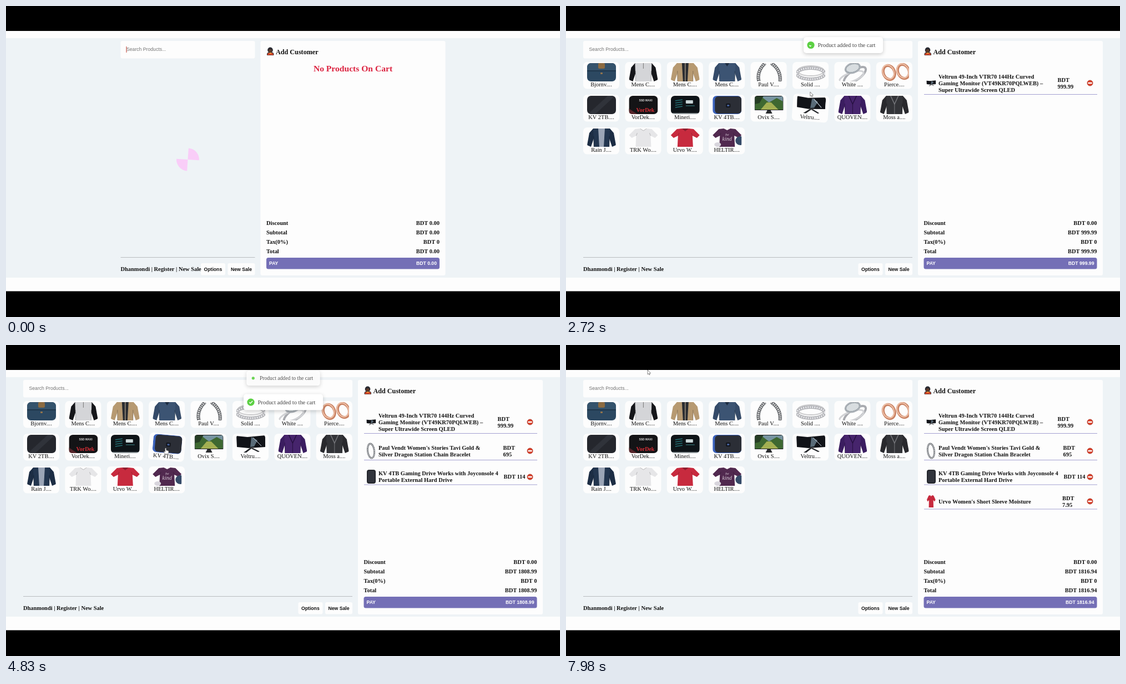
An HTML page with a canvas for the animation above (8 s loop, 998 px wide and 561 px high).

```html
<!DOCTYPE html>
<html lang="en">
<head>
<meta charset="utf-8">
<title>Point of sale</title>
<style>
html, body { margin: 0; width: 100%; height: 100%; overflow: hidden; background: #000 }
canvas { display: block }
</style>
</head>
<body>
<canvas id="stage" width="998" height="561"></canvas>
<script>
const c = document.getElementById('stage').getContext('2d');
const SERIF = '"Liberation Serif", serif', SANS = '"Liberation Sans", sans-serif';
const BODY = '10.4px ' + SERIF, BOLD = 'bold ' + BODY, BUTTON = 'bold 8.67px ' + SANS;
const LOOP = 8000, LOADED = 630, TOAST_LIFE = 2000;

const names = ['Bjornv', 'Mens C', 'Mens C', 'Mens C', 'Paul V', 'Solid ', 'White ', 'Pierce',
  'KV 2TB', 'VorDek', 'Mineri', 'KV 4TB', 'Ovix S', 'Veltru', 'QUOVEN', 'Moss a',
  'Rain J', 'TRK Wo', 'Urvo W', 'HELTIR'];

// Cart lines: time added, price, text lines, first baseline, middle, rule, price x
const cart = [
  { at: 2350, price: 999.99, y: 130.5, mid: 139, rule: 159.5, px: 885.5, wrap: true, thumb: 'screen',
    lines: ['Veltrun 49-Inch VTR70 144Hz Curved', 'Gaming Monitor (VT49KR70PQLWEB) –', 'Super Ultrawide Screen QLED'] },
  { at: 3650, price: 695, y: 188.5, mid: 191, rule: 207.5, px: 895.5, wrap: true, thumb: 'bracelet',
    lines: ["Paul Vendt Women's Stories Tavi Gold &", 'Silver Dragon Station Chain Bracelet'] },
  { at: 4680, price: 114, y: 234.5, mid: 238, rule: 252, px: 896.5, wrap: false, thumb: 'drive',
    lines: ['KV 4TB Gaming Drive Works with Joyconsole 4', 'Portable External Hard Drive'] },
  { at: 5600, price: 7.95, y: 285.5, mid: 282, rule: 296, px: 894, wrap: true, thumb: 'tee',
    lines: ["Urvo Women's Short Sleeve Moisture"] }
];

// Pointer path: time, x, y
const path = [[1380, 560, 50], [1480, 470, 98], [1580, 446, 125], [1690, 444, 211], [1750, 443, 209],
  [1950, 445, 193], [2350, 443, 186], [2650, 441, 162], [2720, 440, 155], [3000, 400, 142],
  [3300, 368, 135], [3650, 355, 138], [4200, 346, 141], [4400, 312, 165], [4680, 290, 182],
  [5000, 285, 190], [5200, 250, 215], [5300, 232, 232], [5580, 225, 237], [6150, 208, 240],
  [6330, 181, 240], [6500, 120, 225], [6590, 95, 172], [6620, 100, 162], [6900, 101, 154],
  [7500, 135, 97], [7980, 147, 45], [8000, 147, 45]];

const clamp = p => Math.max(0, Math.min(1, p));
const easeOut = p => 1 - (1 - clamp(p)) ** 3;

function text(s, x, y, font = BOLD, color = '#111', align = 'left') {
  c.font = font; c.fillStyle = color; c.textAlign = align;
  c.fillText(s, x, y);
}
function box(x, y, w, h, r, color) {
  c.fillStyle = color;
  c.beginPath(); c.roundRect(x, y, w, h, r); c.fill();
}
function poly(points, fill, stroke, width = 1) {
  c.beginPath();
  for (let i = 0; i < points.length; i += 2) c.lineTo(points[i], points[i + 1]);
  if (fill) { c.fillStyle = fill; c.fill(); }
  if (stroke) { c.strokeStyle = stroke; c.lineWidth = width; c.stroke(); }
}
function oval(x, y, rx, ry, tilt, fill, stroke, width = 1, dash = []) {
  c.beginPath(); c.ellipse(x, y, rx, ry, tilt, 0, 7);
  if (fill) { c.fillStyle = fill; c.fill(); }
  if (stroke) {
    c.strokeStyle = stroke; c.lineWidth = width;
    c.setLineDash(dash); c.stroke(); c.setLineDash([]);
  }
}
function at(x, y, draw, sx = 1, sy = sx) {
  c.save(); c.translate(x, y); c.scale(sx, sy); draw(); c.restore();
}

// Product pictures live in a 52 x 33 box
function jacket(body, sleeve = body, inner) {
  poly([11, 0, 4, 8, 0, 30, 7, 33, 14, 12, 38, 12, 45, 33, 52, 30, 48, 8, 41, 0], sleeve);
  poly([11, 0, 41, 0, 40, 33, 12, 33], body);
  if (inner) poly([20, 0, 32, 0, 30, 33, 22, 33], inner);
  poly([12, 33, 12, 14], null, '#0004');
  poly([40, 33, 40, 14], null, '#0004');
}
function tee(color) {
  poly([11, 1, 20, 0, 26, 3, 32, 0, 41, 1, 52, 12, 47, 17, 39, 13, 40, 33,
    12, 33, 13, 13, 5, 17, 0, 12], color);
  poly([13, 13, 15, 8], null, '#0003');
  poly([39, 13, 37, 8], null, '#0003');
}
function slab(color) { box(0, 0, 52, 33, 7, color); }
function lapels(color) {
  poly([19, 0, 26, 15, 33, 0], null, color, 1.5);
  poly([26, 15, 26, 33], null, color);
}
function screen() {
  poly([0, 2, 20, 4, 52, 1, 52, 22, 22, 24, 1, 22], '#111318');
  poly([27, 4, 38, 10, 32, 21, 25, 22], '#596b78');
  poly([30, 5, 45, 20], null, '#c8d4df', 1);
  poly([24, 24, 13, 32, 18, 32, 27, 25, 39, 31, 42, 30, 30, 24], '#25272b');
}
const pictures = [
  () => {
    slab('#2c4861');
    box(0, 0, 52, 13, [7, 7, 0, 0], '#35536c');
    box(20, 0, 12, 10, 2, '#8c6b42');
    poly([0, 14, 52, 14], null, '#1b3044', 1.5);
    box(24, 17, 4, 3, 1, '#93744d');
  },
  () => { jacket('#d4d5d8', '#15161a'); poly([26, 0, 26, 10], null, '#777'); },
  () => { jacket('#b79a72', '#b79a72', '#292b30'); poly([26, 0, 26, 33], null, '#857b6d', 2); },
  () => { jacket('#3c5473', '#354b69'); poly([22, 0, 26, 6, 30, 0], '#1c2b40'); },
  () => {
    for (const [color, width, dash] of [['#55585c', 6, []], ['#d8d8d8', 4, [2, 1.5]]]) {
      c.strokeStyle = color; c.lineWidth = width; c.setLineDash(dash);
      c.beginPath();
      c.moveTo(19, 0); c.quadraticCurveTo(3, 16, 8, 33);
      c.moveTo(30, 0); c.quadraticCurveTo(48, 12, 46, 33);
      c.stroke();
    }
    c.setLineDash([]);
  },
  () => {
    oval(26, 14, 24, 9, 0, null, '#c9c9cb', 2);
    oval(26, 19, 25, 10, 0, null, '#b3b4b8', 6);
    oval(26, 19, 25, 10, 0, null, '#ededf0', 3, [2, 2]);
  },
  () => {
    oval(30, 22, 23, 9, -.6, null, '#a9abb0', 4);
    oval(24, 25, 23, 8, -.35, null, '#d2d3d6', 3);
    oval(26, 9, 15, 10, -.3, '#aab0b6');
    oval(26, 9, 12, 7, -.3, '#d8dde0', '#75808a', 1, [1.5, 1.5]);
  },
  () => {
    for (const [x, y] of [[16, 17], [42, 15]]) {
      oval(x, y, 10, 13, -.4, null, '#c98263', 5);
      oval(x - 1, y - 1, 10, 13, -.4, null, '#efc2aa', 2);
    }
  },
  () => { slab('#25272d'); poly([8, 33, 44, 0], null, '#30333a', 9); },
  () => {
    slab('#141416');
    text('SSD MAXI', 18, 10, 'bold 5px ' + SANS, '#ddd');
    poly([0, 23, 15, 33, 0, 33], '#55252a');
    text('VorDek', 13, 29, 'bold 10px ' + SERIF, '#d72d35');
  },
  () => {
    slab('#0e1418');
    for (let i = 0; i < 4; i++) poly([8, 9 + i * 4, 21, 7 + i * 4], null, '#246f73', 1.3);
    box(27, 8, 13, 6, 1, '#c9d6d8');
    poly([27, 18, 43, 18], null, '#3c8a8c', 1);
    poly([2, 32, 50, 32], null, '#b9c2c4', 1.5);
  },
  () => { slab('#3b63bd'); box(4, 1, 48, 31, 6, '#2b2e36'); box(24, 14, 8, 7, 1, '#11141b'); box(26, 16, 4, 3, 0, '#45609a'); },
  () => {
    box(0, 0, 52, 26, 1, '#15181a');
    box(1, 1, 50, 24, 0, '#7794a0');
    poly([1, 8, 14, 3, 26, 12, 40, 4, 51, 10, 51, 25, 1, 25], '#3e6831');
    poly([22, 12, 30, 12, 43, 25, 11, 25], '#a3af52');
    poly([1, 1, 16, 1, 9, 13, 1, 15], '#263d24');
    poly([23, 26, 29, 26, 32, 32, 20, 32], '#292b2e');
  },
  screen,
  () => { jacket('#46246c', '#3b1d60'); lapels('#261040'); },
  () => { jacket('#333438', '#29292d'); lapels('#75767b'); },
  () => { jacket('#23364f', '#1c2d44', '#9ba5b6'); },
  () => { tee('#e6e6e8'); poly([20, 0, 26, 4, 32, 0], null, '#bbb'); },
  () => { tee('#c72a3e'); poly([20, 0, 26, 5, 32, 0], '#8d1e2f'); },
  () => {
    tee('#51294f');
    oval(50, 22, 9, 8, 0, '#354a68');
    oval(9, 29, 6, 4, 0, '#d8d5dc');
    text('be', 26, 13, 'italic 7px ' + SERIF, '#d7cbd7', 'center');
    text('kind', 26, 22, 'italic 10px ' + SERIF, '#d7cbd7', 'center');
  }
];
const thumbs = {
  screen: () => at(649.5, 134, screen, .32),
  bracelet: () => {
    oval(657.5, 191, 6, 13, -.12, null, '#777a7e', 3);
    oval(657.5, 191, 6, 13, -.12, null, '#c9cbce', 1.4, [2, 1]);
  },
  drive: () => { box(650, 225, 16, 25, 4, '#24262c'); box(652, 227, 12, 21, 3, '#31343c'); },
  tee: () => at(650, 271, () => tee('#c72a3e'), .3, .67)
};

const cardX = i => 31 + i % 8 * 75.4;
const cardY = i => 101 + Math.floor(i / 8) * 59;

function pointer(t) {
  const i = path.findIndex(p => p[0] > t);
  if (i < 1) return [-99, -99];
  const [t0, x0, y0] = path[i - 1], [t1, x1, y1] = path[i], p = (t - t0) / (t1 - t0);
  return [x0 + (x1 - x0) * p, y0 + (y1 - y0) * p];
}
function hovered(t) {
  const [x, y] = pointer(t);
  return names.findIndex((n, i) => x >= cardX(i) && x <= cardX(i) + 65 && y >= cardY(i) && y <= cardY(i) + 48);
}

function drawCards(t) {
  // Each card leans in and out with the share of recent time spent under the pointer
  const lean = names.map(() => 0);
  for (let k = 0; k < 20; k++) {
    const i = hovered(t - k * 20);
    if (i >= 0) lean[i] += 5 / 20;
  }
  names.forEach((name, i) => {
    c.save();
    c.translate(cardX(i) + 32.5, cardY(i) + 24);
    c.rotate(lean[i] * Math.PI / 180);
    box(-32.5, -24, 65, 48.5, 7, '#fdfdfd');
    c.save();
    c.beginPath(); c.roundRect(-25.5, -22, 52, 33, 5); c.clip();
    at(-25.5, -22, pictures[i]);
    c.restore();
    text(name + '....', 0, 20, BODY, '#111', 'center');
    c.restore();
  });
}

function drawLeft(t, x, right) {
  box(x, 63, right - x, 31.5, 3, '#fdfdfd');
  text('Search Products...', x + 10.5, 81, '8.67px ' + SANS, '#757575');
  if (t < 530) box(x + 10, 73, 1, 11, 0, '#c0392b');
  box(x, 453, right - x, 1, 0, '#b9bcc0');
  box(right - 97.5, 464, 44, 21.5, 3, '#fdfdfd');
  box(right - 49, 464, 49, 21.5, 3, '#fdfdfd');
  text('Dhanmondi | Register | New Sale', x, 478);
  text('Options', right - 92, 477.6, BUTTON);
  text('New Sale', right - 43.5, 477.6, BUTTON);
}

function drawCustomer() {
  oval(651.5, 79.5, 4.8, 5, 0, '#292a31');
  oval(651.5, 81, 3, 3, 0, '#5a3a2b');
  box(645.5, 83.5, 12.5, 5.5, [4, 4, 1, 1], '#26262b');
  box(646.5, 84.5, 10.5, 4, [3, 3, 0, 0], '#d9482b');
  box(650, 84, 3.5, 2, 1, '#efa02f');
  text('Add Customer', 661.5, 86.5, 'bold 12.17px ' + SERIF);
}

function drawLine(item) {
  thumbs[item.thumb]();
  item.lines.forEach((s, i) => text(s, 671, item.y + i * 12));
  if (item.wrap) {
    text('BDT', item.px, item.mid - 2.5);
    text(item.price, item.px, item.mid + 9.5);
  } else text('BDT ' + item.price, item.px, item.mid + 3);
  oval(944, item.mid, 5, 5, 0, '#d8402a', '#a92f20', .8);
  box(940.5, item.mid - 1.2, 7, 2.4, .5, '#fff');
  box(645, item.rule - .5, 312, 1, 0, '#a4a1d2');
}

function drawCart(t) {
  const items = cart.filter(item => t >= item.at);
  const total = 'BDT ' + items.reduce((sum, item) => sum + item.price, 0).toFixed(2);
  box(634, 63, 333, 423, 3, '#fdfdfd');
  drawCustomer();
  if (!items.length) text('No Products On Cart', 800.5, 118, 'bold 15.6px ' + SERIF, '#dc2340', 'center');
  items.forEach(drawLine);
  [['Discount', 'BDT 0.00'], ['Subtotal', total], ['Tax(0%)', 'BDT 0'], ['Total', total]].forEach(([label, value], i) => {
    text(label, 644.5, 395 + i * 17.1);
    text(value, 956.5, 395 + i * 17.1, BOLD, '#111', 'right');
  });
  box(644.5, 454, 312, 20.5, 3.5, '#746fb6');
  text('PAY', 649.5, 467, BUTTON, '#fff');
  text(total, 951.5, 467, BUTTON, '#fff', 'right');
}

function drawToast(t, i) {
  const age = t - cart[i].at;
  if (age < 0 || age >= TOAST_LIFE + 400) return;
  const enter = easeOut(age / 350), leave = easeOut((age - TOAST_LIFE) / 400);
  const shift = cart.slice(i + 1).reduce((sum, next) => sum + 34 * easeOut((t - next.at) / 230), 0);
  c.save();
  c.globalAlpha = (.5 + .5 * enter) * (1 - leave);
  c.translate(499.5, 70.5 + shift - 58 * (1 - enter) - 43 * leave);
  const s = (.6 + .4 * enter) * (1 - .4 * leave);
  c.scale(s, s);
  c.shadowColor = '#0003'; c.shadowBlur = 7; c.shadowOffsetY = 2;
  box(-71.5, -14.5, 143, 29, 5, '#fff');
  c.shadowColor = 'transparent';
  text('Product added to the cart', -46, 3.5, BODY, '#444');
  const icon = easeOut((age - 100) / 300), tick = clamp((age - 300) / 200);
  at(-58.5, 0, () => {
    oval(0, 0, 6.6, 6.6, 0, '#5cd043');
    if (tick) poly([-2.8, .2, -.8, 2.2, -.8 + 4 * tick, 2.2 - 4.4 * tick], null, '#fff', 1.4);
  }, icon);
  c.restore();
}

function drawSpinner(t) {
  c.save();
  c.translate(327.5, 277);
  c.rotate(.06 + t / 1000 * 2 * Math.PI);
  c.fillStyle = '#f9cdf8';
  for (const start of [-.5, .5]) {
    c.beginPath(); c.moveTo(0, 0);
    c.arc(0, 0, 20.5, start * Math.PI, (start + .5) * Math.PI);
    c.fill();
  }
  c.restore();
}

function drawPointer(t) {
  const [x, y] = pointer(t);
  const hand = hovered(t) >= 0 || hovered(t - 40) >= 0;
  at(x, y, () => poly(hand
    ? [-1, 1, 0, 0, 1, 1, 1, 4, 5, 5, 5.5, 8, 4, 11, -1, 11, -3.5, 7, -2.5, 6, -1, 7, -1, 1]
    : [0, 0, 0, 8, 1.8, 6.4, 3, 9, 4.2, 8.4, 3.1, 6, 5.6, 6, 0, 0], '#fff', '#555', .7));
}

function draw() {
  const t = performance.now() % LOOP, loading = t < LOADED;
  box(0, 0, 998, 561, 0, '#fdfdfd');
  box(0, 58, 998, 432, 0, '#eef3f6');
  drawLeft(t, loading ? 206.5 : 31, loading ? 448.5 : 624);
  at(loading ? -175.5 : 0, 0, () => drawCart(t));
  if (loading) drawSpinner(t); else drawCards(t);
  cart.forEach((item, i) => drawToast(t, i));
  drawPointer(t);
  box(0, 0, 998, 45, 0, '#000');
  box(0, 514.5, 998, 47, 0, '#000');
  requestAnimationFrame(draw);
}
draw();
</script>
</body>
</html>
```
